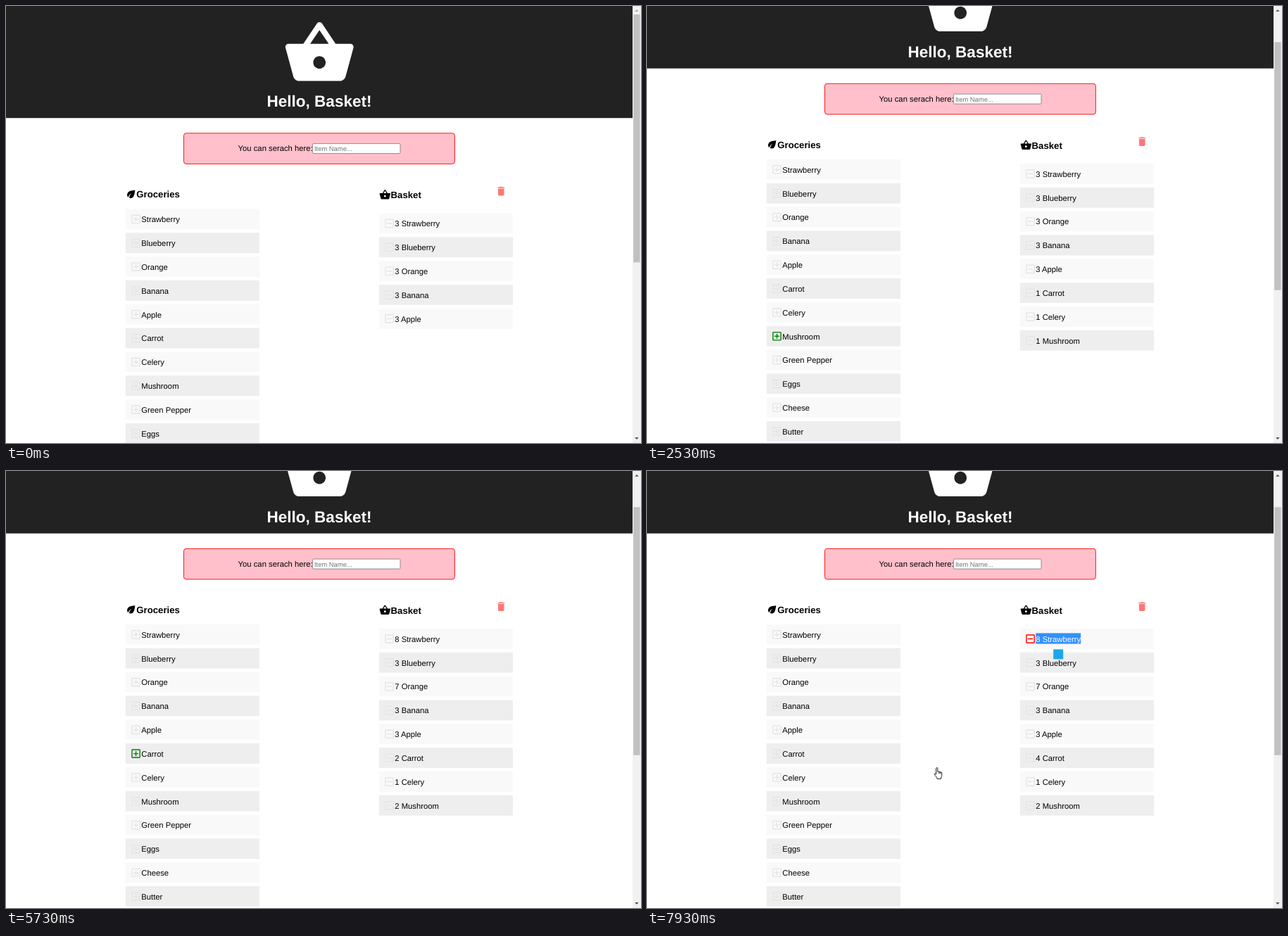
An HTML page for the animation above (8 s loop, 902 by 621 pixels).

```html
<!DOCTYPE html>
<html lang="en">
<head>
<meta charset="utf-8">
<title>Hello, Basket!</title>
<style>
html, body { margin: 0; width: 100%; height: 100%; overflow: hidden; background: #fff; }
svg { display: block; width: 100%; height: 100%; }
text { font: 11.28px "Liberation Sans", Arial, sans-serif; text-rendering: geometricPrecision; white-space: pre; }
.h1 { font-size: 22.55px; font-weight: bold; fill: #fff; }
.h3 { font-size: 13.2px; font-weight: bold; }
.hint { font-size: 9.4px; fill: #757575; }
.icon { fill: #e5e5e5; }
.plus.on { fill: green; }
.minus.on { fill: red; }
.mark { fill: #3390ff; visibility: hidden; }
.sel .mark { visibility: visible; }
.sel text { fill: #fff; }
</style>
</head>
<body>
<svg viewBox="0 0 902 621" xmlns="http://www.w3.org/2000/svg">
  <defs>
    <path id="bag" d="M17.21 9l-4.38-6.56c-.19-.28-.51-.42-.83-.42-.32 0-.64.14-.83.43L6.79 9H2c-.55 0-1 .45-1 1 0 .09.01.18.04.27l2.54 9.27c.23.84 1 1.46 1.92 1.46h13c.92 0 1.69-.62 1.93-1.46l2.54-9.27L23 10c0-.55-.45-1-1-1zM9 9l3-4.4L15 9zm3 8c-1.1 0-2-.9-2-2s.9-2 2-2 2 .9 2 2-.9 2-2 2z"/>
    <path id="leaf" d="M6.05 8.05c-2.73 2.73-2.73 7.15-.02 9.88 1.47-3.4 4.09-6.24 7.36-7.93-2.77 2.34-4.71 5.61-5.39 9.32 2.6 1.23 5.8.78 7.95-1.37C19.43 14.47 20 4 20 4S9.53 4.57 6.05 8.05z"/>
    <path id="bin" d="M6 19c0 1.1.9 2 2 2h8c1.1 0 2-.9 2-2V7H6zM19 4h-3.5l-1-1h-5l-1 1H5v2h14z"/>
    <path id="plus" fill-rule="evenodd" d="M5 3h14a2 2 0 0 1 2 2v14a2 2 0 0 1-2 2H5a2 2 0 0 1-2-2V5a2 2 0 0 1 2-2zM5 5v14h14V5zM11 7h2v4h4v2h-4v4h-2v-4H7v-2h4z"/>
    <path id="minus" fill-rule="evenodd" d="M5 3h14a2 2 0 0 1 2 2v14a2 2 0 0 1-2 2H5a2 2 0 0 1-2-2V5a2 2 0 0 1 2-2zM5 5v14h14V5zM7 11h10v2H7z"/>
  </defs>
  <g id="page">
    <rect width="890" height="159.2" fill="#222"/>
    <use href="#bag" transform="translate(392.4 14.1) scale(4.404)" fill="#fff"/>
    <text class="h1" x="445" y="143" text-anchor="middle">Hello, Basket!</text>
    <rect x="252.5" y="180.8" width="384.9" height="43.6" rx="3.5" fill="pink" stroke="red" stroke-width=".9"/>
    <text x="329.6" y="206">You can serach here:</text>
    <rect x="435.6" y="195.6" width="124.4" height="14" rx="1.2" fill="#fff" stroke="#767676" stroke-width=".8"/>
    <text class="hint" x="438" y="206">Item Name...</text>
    <use href="#leaf" transform="translate(169.2 259) scale(.705)"/>
    <text class="h3" x="185.3" y="272">Groceries</text>
    <use href="#bag" transform="translate(529.9 259.6) scale(.705)"/>
    <text class="h3" x="546.6" y="273.3">Basket</text>
    <use href="#bin" transform="translate(694.8 254.6) scale(.705)" fill="#ff7676"/>
  </g>
  <rect id="badge" width="14" height="14" fill="#1ea7e8"/>
  <rect x="890" width="12" height="621" fill="#f1f1f1"/>
  <rect id="thumb" x="891.2" width="9.4" height="352.4" fill="#c1c1c1"/>
  <path id="up" d="M893.2 7.8h5.4l-2.7-2.9z"/>
  <path d="M893.2 613h5.4l-2.7 2.9z" fill="#505050"/>
  <path id="hand" fill="#fff" stroke="#000" stroke-width=".9" stroke-linejoin="round"
    d="M3.2 10V1.7a1.1 1.1 0 0 1 2.2 0V6.4c.3-.9 1.9-.8 2 .2c.4-.7 1.8-.5 1.9.5c.5-.6 1.9-.3 1.9.8V11.6c0 2-1.1 2.6-1.2 4.8H4.7C4.3 13.7 1.7 12 .8 10C.4 8.9 1.9 8.6 3.2 10zM7.4 6.6v2.6M9.3 7.1v2.3"/>
</svg>
<script>
const LOOP = 8000, TICK = 200 / 3, PITCH = 33.83, SCROLL = 70.5;
const NAMES = ['Strawberry', 'Blueberry', 'Orange', 'Banana', 'Apple', 'Carrot',
  'Celery', 'Mushroom', 'Green Pepper', 'Eggs', 'Cheese', 'Butter'];
const $ = id => document.getElementById(id);

function add(parent, tag, attrs) {
  const el = document.createElementNS('http://www.w3.org/2000/svg', tag);
  for (const k in attrs) el.setAttribute(k, attrs[k]);
  return parent.appendChild(el);
}

function makeRow(x, top, i, kind) {
  const y = top + i * PITCH;
  const g = add($('page'), 'g', {});
  add(g, 'rect', { x, y, width: 190.2, height: 28.9, fill: i % 2 ? '#eee' : '#f9f9f9' });
  const icon = add(g, 'use', { href: '#' + kind, class: 'icon ' + kind,
    transform: `translate(${x + 6.3} ${y + 6.1}) scale(.705)` });
  const mark = add(g, 'rect', { class: 'mark', x: x + 22.5, y: y + 6.4, height: 15.2 });
  const text = add(g, 'text', { x: x + 22.5, y: y + 18.8 });
  return { g, icon, mark, text, x: x + 22.5, mid: y + 14.4 };
}

const shelf = NAMES.map((name, i) => {
  const row = makeRow(169.8, 288.4, i, 'plus');
  row.text.textContent = name;
  return row;
});
const basket = NAMES.slice(0, 8).map((_, i) => makeRow(529.8, 294.5, i, 'minus'));

// hover: shelf row, minus: basket row, sel: [list, row], counts: by row number
const START = { hover: -1, minus: -1, sel: null, badge: false,
  0: 3, 1: 3, 2: 3, 3: 3, 4: 3, 5: 0, 6: 0, 7: 0 };
const STEPS = [
  [1270, { hover: 5 }], [1670, { 5: 1 }],
  [1870, { hover: 6 }], [2070, { 6: 1 }],
  [2330, { hover: 7 }], [2530, { 7: 1 }], [3070, { 7: 2 }],
  [3270, { hover: 4 }], [3330, { hover: 1 }], [3400, { hover: 0 }],
  [3800, { 0: 4 }], [3930, { 0: 5, sel: [shelf, 0] }], [4070, { 0: 6 }],
  [4200, { 0: 7 }], [4330, { 0: 8 }], [4400, { badge: true }],
  [4530, { hover: 1 }], [4600, { hover: 2 }], [4730, { sel: null, badge: false }],
  [4870, { 2: 4 }], [5070, { 2: 5 }], [5130, { sel: [shelf, 2] }],
  [5270, { 2: 6 }], [5330, { badge: true }], [5400, { 2: 7 }],
  [5470, { hover: 4 }], [5530, { hover: 5 }],
  [5670, { 5: 2 }], [5730, { sel: null, badge: false }],
  [5930, { 5: 3, sel: [shelf, 5] }], [6070, { 5: 4 }], [6200, { badge: true }],
  [6330, { hover: -1 }], [6670, { minus: 0 }],
  [6930, { sel: null, badge: false }], [7070, { sel: [basket, 0] }], [7270, { badge: true }]
];
// pointer sweeps: start, arrival, hidden at, from, to
const SWEEPS = [
  [6330, 6600, 6800, [161, 569], [536, 429]],
  [7670, 7930, LOOP, [713, 493], [407.5, 421]]
];

const show = (el, on) => el.setAttribute('visibility', on ? 'visible' : 'hidden');
const clamp = v => Math.min(1, Math.max(0, v));

function drawRow(row, list, i, s) {
  const picked = !!s.sel && s.sel[0] === list && s.sel[1] === i;
  row.g.classList.toggle('sel', picked);
  if (!picked) return;
  const w = row.text.getComputedTextLength();
  row.mark.setAttribute('width', w);
  $('badge').setAttribute('x', row.x + w / 2 - 7);
  $('badge').setAttribute('y', row.mid + 15 - SCROLL);
}

function draw(time) {
  const t = Math.floor((time + 4) / TICK) * TICK + 1;
  const s = { ...START };
  for (const [at, change] of STEPS) if (t >= at) Object.assign(s, change);

  const p = clamp((t - 267.7) / 666.7);
  const y = SCROLL * (1 - (1 - p) ** 2);
  $('page').setAttribute('transform', `translate(0 ${-y})`);
  $('thumb').setAttribute('y', 12 + y * .558);
  $('up').setAttribute('fill', y ? '#505050' : '#a3a3a3');

  shelf.forEach((row, i) => {
    row.icon.classList.toggle('on', s.hover === i);
    drawRow(row, shelf, i, s);
  });
  basket.forEach((row, i) => {
    show(row.g, s[i]);
    row.g.style.display = s[i] ? '' : 'none';
    row.text.textContent = s[i] + ' ' + NAMES[i];
    row.icon.classList.toggle('on', s.minus === i);
    drawRow(row, basket, i, s);
  });
  show($('badge'), s.badge);

  const sweep = SWEEPS.find(([from, , end]) => t >= from && t < end);
  show($('hand'), sweep);
  if (sweep) {
    const [from, to, , a, b] = sweep;
    const k = clamp((t - from) / (to - from));
    const pos = a.map((v, i) => v + (b[i] - v) * k);
    $('hand').setAttribute('transform', `translate(${pos})`);
  }
}

const t0 = performance.now();
function loop() {
  draw((performance.now() - t0) % LOOP);
  requestAnimationFrame(loop);
}
loop();
</script>
</body>
</html>
```
